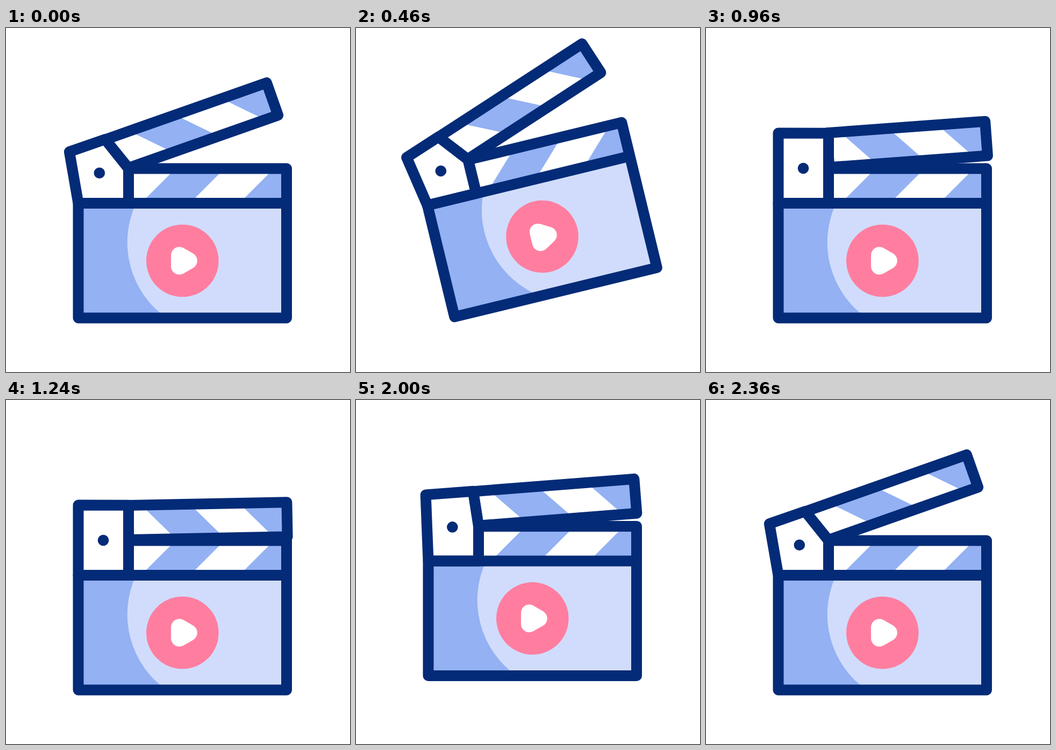
These frames come from a looping animation (640x640 px, 2.4 s). An HTML page:

```html
<!DOCTYPE html>
<html lang="en">
<head>
<meta charset="utf-8">
<title>Clapperboard</title>
<style>
  html, body { margin: 0; width: 100%; height: 100%; overflow: hidden; background: #fff; }
  svg { display: block; width: 100vw; height: 100vh; }
  .line { stroke: #042b77; stroke-width: 20; stroke-linejoin: round; stroke-linecap: round; }
  .spark { stroke: #ffcb52; stroke-width: 20; stroke-linecap: round; }
</style>
</head>
<body>
<svg viewBox="0 0 640 640">
  <g id="board">
    <g id="arm">
      <path id="armFill" fill="#fff"/>
      <path fill="#93b1f3" d="M33.500 -56L124 -56L169.500 -10L79 -10ZM215.500 -56H296V-10H261Z"/>
      <path id="armLine" class="line" fill="none"/>
    </g>
    <path fill="#fff" d="M228 261.500H522V326H228Z"/>
    <path fill="#93b1f3" d="M306 271L260 317H351L397 271ZM489 271L443 317H522V271Z"/>
    <path fill="#93b1f3" d="M134.500 326H522V539.500H134.500Z"/>
    <path fill="#d1dcfc" d="M242 326A171.700 171.700 0 0 0 299.500 540H522V326Z"/>
    <path id="hinge" class="line" fill="#fff"/>
    <path class="line" fill="none" d="M228 261.500H522V326H228ZM134.500 326H522V539.500H134.500Z"/>
    <circle id="dot" r="10.300" fill="#042b77"/>
    <circle cx="328.300" cy="433" r="67.300" fill="#ff7ea0"/>
    <path fill="#fff" stroke="#fff" stroke-width="31" stroke-linejoin="round"
      d="M322.500 422.700V443.300L340.300 433Z"/>
  </g>
  <line class="spark"/>
  <line class="spark"/>
</svg>
<script>
const LOOP = 2400, OPEN = 19.4, CLAP = 12.2;
const PIVOT = { x: 228, y: 261.5 };
const $ = id => document.getElementById(id);
const sparkLines = document.querySelectorAll('.spark');

// Keyframes as [time, value], eased in and out between neighbours.
const tiltKeys = [[220, 0], [370, -17], [690, 0]];
const liftKeys = [[220, 0], [500, -43], [615, -43], [880, 0], [1900, 0], [2080, -45], [2300, 0]];
const hingeKeys = [[620, OPEN], [840, 0], [1900, 0], [2225, OPEN]];
const clapKeys = [[890, 0], [1070, CLAP], [1280, 0], [1460, CLAP], [1680, 0]];
const sparkStarts = [606, 2120], SPARK_TIME = 240;
const sparks = [
  { x: 564.5, y: 164.8, angle: -41, length: 48 },
  { x: 570, y: 200.3, angle: 21, length: 45 }
];

const rad = deg => deg * Math.PI / 180;
const ease = x => { x = Math.min(1, Math.max(0, x)); return x * x * (3 - 2 * x); };

function track(keys, t) {
  if (t <= keys[0][0]) return keys[0][1];
  for (let i = 1; i < keys.length; i++) {
    const [t0, v0] = keys[i - 1], [t1, v1] = keys[i];
    if (t < t1) return v0 + (v1 - v0) * ease((t - t0) / (t1 - t0));
  }
  return keys[keys.length - 1][1];
}

// Point given relative to the pivot, swung upwards by an angle.
function swing(x, y, deg) {
  const c = Math.cos(rad(deg)), s = Math.sin(rad(deg));
  return `${PIVOT.x + c * x + s * y} ${PIVOT.y - s * x + c * y}`;
}

function drawSparks(t) {
  const start = sparkStarts.find(s => t > s && t < s + SPARK_TIME);
  const p = start === undefined ? 0 : (t - start) / SPARK_TIME;
  const head = ease(p / 0.6), tail = ease((p - 0.4) / 0.6);
  sparks.forEach((spark, i) => {
    const el = sparkLines[i];
    const dx = Math.cos(rad(spark.angle)) * spark.length;
    const dy = Math.sin(rad(spark.angle)) * spark.length;
    el.setAttribute('visibility', head - tail > 0.01 ? 'visible' : 'hidden');
    el.setAttribute('x1', spark.x + dx * tail);
    el.setAttribute('y1', spark.y + dy * tail);
    el.setAttribute('x2', spark.x + dx * head);
    el.setAttribute('y2', spark.y + dy * head);
  });
}

function draw(t) {
  const hinge = track(hingeKeys, t);
  const left = -65.5 * Math.tan(rad(hinge));
  const armPath = `M0 -1.200L${left} -65.300H295.300V-1.200Z`;

  $('board').setAttribute('transform',
    `translate(0 ${track(liftKeys, t)}) rotate(${track(tiltKeys, t)} 320 355)`);
  // Claps turn the arm around a point inside the hinge.
  $('arm').setAttribute('transform',
    `translate(${PIVOT.x} ${PIVOT.y}) rotate(${-track(clapKeys, t)} -14 -21) rotate(${-hinge})`);
  $('armFill').setAttribute('d', armPath);
  $('armLine').setAttribute('d', armPath);
  $('hinge').setAttribute('d',
    `M134.500 326L${swing(-93.5, -66, hinge)}L${swing(left, -65.8, hinge)}L228 261.500V326Z`);

  const k = hinge / OPEN;
  $('dot').setAttribute('cx', 181 - 7.2 * k);
  $('dot').setAttribute('cy', 261 + 8.8 * k);
  drawSparks(t);
}

const begin = performance.now();
function frame() {
  draw((performance.now() - begin) % LOOP);
  requestAnimationFrame(frame);
}
frame();
</script>
</body>
</html>
```
